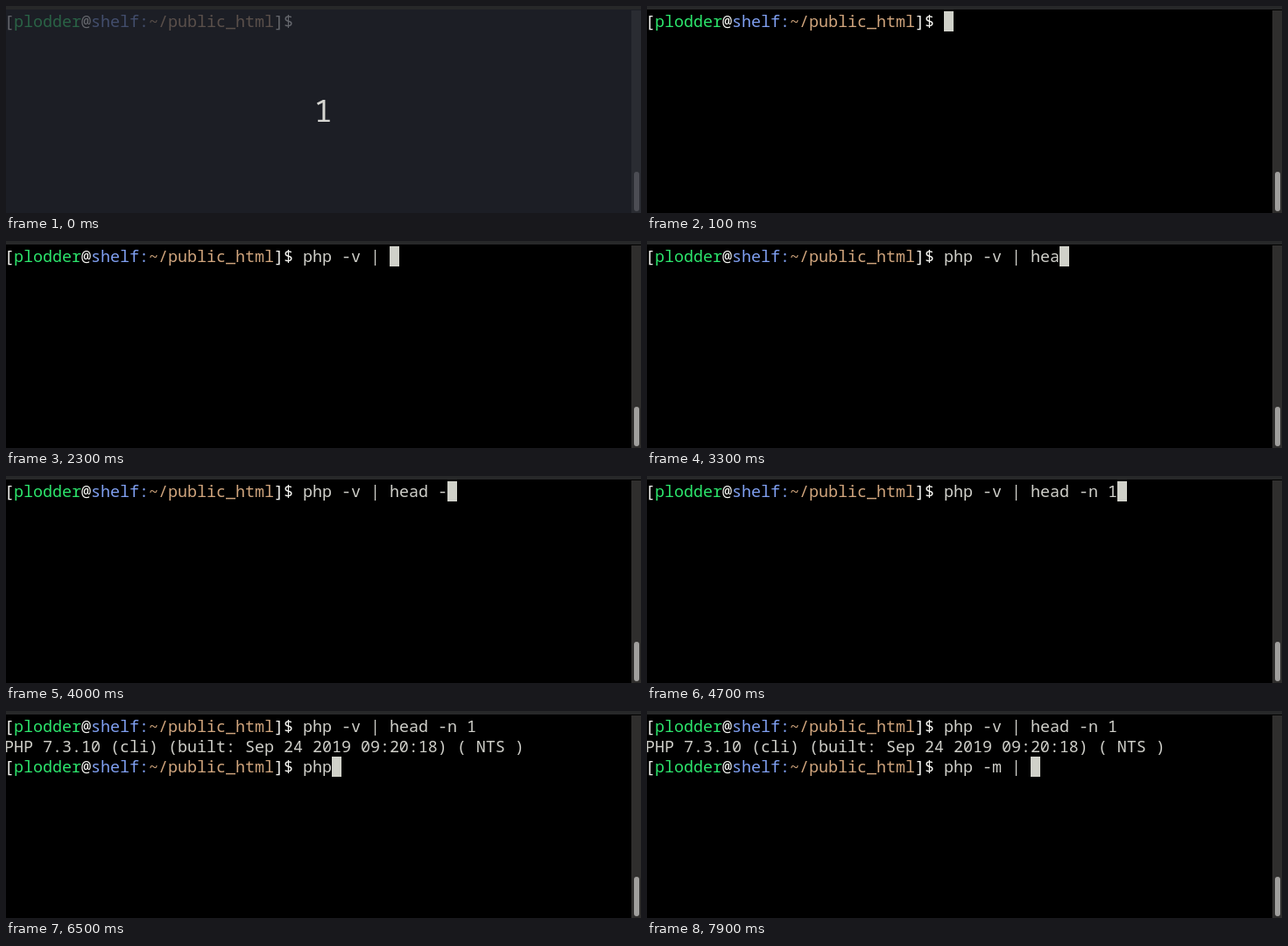
An HTML page that plays this animation: 725x236 px, repeating every 8 s.

```html
<!DOCTYPE html>
<html lang="en">
<head>
<meta charset="utf-8">
<title>Terminal</title>
<style>
  html, body { margin: 0; width: 100%; height: 100%; overflow: hidden; background: #000; }
  #stage { position: relative; width: 725px; height: 236px; overflow: hidden; background: #000; }
  #stage > * { position: absolute; }
  .row {
    left: -2px; height: 23px; white-space: pre; color: #cfcfc9;
    font: 18.334px/23px "Noto Sans Mono", monospace; font-variant-ligatures: none;
  }
  .row b { font-weight: 400; color: #f4f4f0; }
  .row .user { color: #2ce56c; }
  .row .host { color: #7f9ff0; }
  .row .path { color: #cfa47c; }
  #line1 { top: 5px; }
  #line2 { top: 28px; }
  #line3 { top: 51px; }
  #cursor { width: 11px; height: 23px; background: #d0d1c9; }
  #track { left: 714px; top: 5px; width: 11px; height: 231px; background: #2f2e2d; }
  #thumb { left: 717px; top: 189px; width: 6px; height: 45px; border-radius: 3px; background: #a09f9d; }
  #top { left: 0; top: 0; width: 725px; height: 4px; background: #272829; }
  #shade {
    left: 0; top: 4px; width: 725px; height: 232px; background: rgba(41, 44, 54, .7);
    color: #d6d6d2; text-align: center; text-indent: -1px;
    font: 35px/229px "Noto Sans Mono", monospace;
  }
</style>
</head>
<body>
<div id="stage">
  <div class="row" id="line1"></div>
  <div class="row" id="line2">PHP 7.3.10 (cli) (built: Sep 24 2019 09:20:18) ( NTS )</div>
  <div class="row" id="line3"></div>
  <div id="cursor"></div>
  <div id="track"></div>
  <div id="thumb"></div>
  <div id="top"></div>
  <div id="shade">1</div>
</div>
<script>
  const LOOP = 8000, CELL = 11, ROW = 23, PROMPT_COLS = 31;
  const SHADE_END = 100, ENTER = 4800, OUTPUT = 4900, BLINK = [5300, 5900];

  // Each entry: time in ms, characters typed by then
  const first = {
    text: 'php -v | head -n 1',
    keys: [[600, 2], [700, 3], [900, 4], [1200, 6], [1500, 7], [2000, 8], [2300, 9], [2400, 10],
           [2700, 11], [3300, 12], [3500, 13], [3600, 14], [4000, 15], [4300, 16], [4500, 17], [4700, 18]]
  };
  const second = {
    text: 'php -m | ',
    keys: [[6300, 1], [6400, 2], [6500, 3], [6700, 4], [7000, 6], [7500, 7], [7900, 9]]
  };

  const el = id => document.getElementById(id);
  const cursor = el('cursor'), shade = el('shade');
  const show = (node, on) => { node.style.visibility = on ? 'visible' : 'hidden'; };

  function addPrompt(row) {
    row.innerHTML = '<b>[</b><span class="user">plodder</span><b>@</b><span class="host">shelf:</span>' +
      '<span class="path">~/public_html</span><b>]$ </b><span></span>';
    return row.lastChild;
  }
  first.node = addPrompt(el('line1'));
  second.node = addPrompt(el('line3'));

  function type(command, t) {
    const count = command.keys.reduce((n, [at, typed]) => t >= at ? typed : n, 0);
    const text = command.text.slice(0, count);
    if (command.node.textContent !== text) command.node.textContent = text;
    return count;
  }

  function placeCursor(col, row) {
    cursor.style.left = col * CELL - 2 + 'px';
    cursor.style.top = row * ROW + 6 + 'px';
  }

  function draw(t) {
    const a = type(first, t), b = type(second, t);
    const done = t >= OUTPUT;
    show(el('line2'), done);
    show(el('line3'), done);
    show(shade, t < SHADE_END);
    show(cursor, t >= SHADE_END && !(t >= BLINK[0] && t < BLINK[1]));
    if (done) placeCursor(PROMPT_COLS + b, 2);
    else if (t >= ENTER) placeCursor(0, 1);
    else placeCursor(PROMPT_COLS + a, 0);
  }

  const start = performance.now();
  function tick() {
    draw((performance.now() - start) % LOOP);
    requestAnimationFrame(tick);
  }
  draw(0);
  requestAnimationFrame(tick);
</script>
</body>
</html>
```
